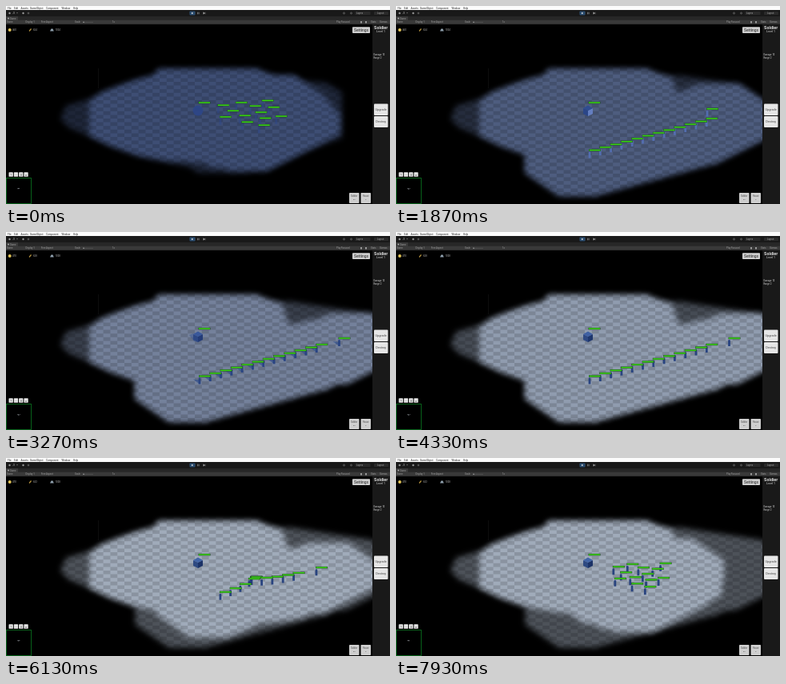
Recreate the animation shown at these times as an HTML page with a canvas. Size 480 px wide and 248 px high, loop 8 s.

```html
<!DOCTYPE html>
<html lang="en">
<head>
<meta charset="utf-8">
<title>Island soldiers</title>
<style>
  html, body { margin: 0; width: 100%; height: 100%; overflow: hidden; background: #000; }
  canvas, svg { position: absolute; left: 0; top: 0; width: 480px; height: 248px; }
  text { font-family: Roboto, "Liberation Sans", sans-serif; fill: #ddd; }
  .mid { text-anchor: middle; }
  .menu text { font-size: 3px; fill: #222; }
  .bar text { font-size: 2.8px; fill: #a4a4a4; }
  .hud text { font-size: 2.8px; fill: #b8b8b8; }
  .btn rect { fill: #e6e6e6; }
  .btn .dim { fill: #cfcfcf; }
  .btn text { fill: #444; text-anchor: middle; }
</style>
</head>
<body>
<canvas id="view" width="480" height="248"></canvas>
<svg viewBox="0 0 480 248">
  <rect width="480" height="5" fill="#fbfbfb"/>
  <g class="menu">
    <text x="2" y="3.6">File</text><text x="10" y="3.6">Edit</text>
    <text x="18.5" y="3.6">Assets</text><text x="30" y="3.6">GameObject</text>
    <text x="50" y="3.6">Component</text><text x="69.5" y="3.6">Window</text>
    <text x="84" y="3.6">Help</text>
  </g>
  <rect y="5" width="480" height="8" fill="#191919"/>
  <rect y="13" width="480" height="5" fill="#272727"/>
  <rect y="13" width="15" height="5" fill="#3a3a3a"/>
  <rect y="17.7" width="480" height="5.3" fill="#393939"/>
  <rect y="22.6" width="480" height=".6" fill="#1c1c1c"/>
  <g class="bar">
    <circle cx="4.5" cy="9" r="1.2" fill="#999"/>
    <text x="8" y="10">JS</text><path d="M13 8.300h2l-1 1.300z" fill="#888"/>
    <circle cx="21.500" cy="9" r="1.200" fill="#999"/>
    <circle cx="28" cy="9" r=".9" fill="none" stroke="#999" stroke-width=".5"/>
    <rect x="229.500" y="6.500" width="7" height="5" rx=".8" fill="#2b4d70"/>
    <path d="M232 7.700v2.600l2.200-1.300z" fill="#ddd"/>
    <path d="M239.600 7.700v2.600m1.500-2.600v2.600" stroke="#bbb" stroke-width=".6"/>
    <path d="M246.700 7.700v2.600l2-1.300zM249.300 7.700v2.600" stroke="#bbb" stroke-width=".3" fill="#bbb"/>
    <circle cx="422.500" cy="9" r="1" fill="none" stroke="#999" stroke-width=".5"/>
    <circle cx="431.500" cy="9" r="1" fill="none" stroke="#999" stroke-width=".5"/>
    <rect x="436.500" y="7" width="19" height="4" rx=".6" fill="#2a2a2a"/>
    <rect x="460" y="7" width="18" height="4" rx=".6" fill="#2a2a2a"/>
    <text x="438" y="10">Layers</text><text x="464" y="10">Layout</text>
    <circle cx="3" cy="15.500" r="1" fill="#aaa"/>
    <text x="5" y="16.500">Game</text>
    <text x="1" y="21.300">Game</text><text x="24.500" y="21.300">Display 1</text>
    <text x="44" y="21.300">Free Aspect</text><text x="86" y="21.300">Scale</text>
    <path d="M97 20.300h12" stroke="#666" stroke-width=".5"/>
    <circle cx="97" cy="20.300" r=".8" fill="#aaa"/><text x="133" y="21.300">1x</text>
    <text x="413" y="21.300">Play Focused</text>
    <path d="M443 19h2v2.500h-2zM449 19h2v2.500h-2z" fill="#999"/>
    <text x="456" y="21.300">Stats</text><text x="467" y="21.300">Gizmos</text>
  </g>

  <rect x="458" y="23" width="22" height="225" fill="#191919"/>
  <text class="mid" x="468.700" y="28.500" font-size="5.400" font-weight="700">Soldier</text>
  <text class="mid" x="468.500" y="33" font-size="3.500">Level 1</text>
  <text x="459.500" y="62.400" font-size="2.600">Damage: 10</text>
  <text x="459.500" y="66" font-size="2.600">Range: 2</text>

  <g class="btn">
    <rect x="460" y="122.500" width="17.500" height="14.500" rx="1"/>
    <text x="468.700" y="131.200" font-size="3.800">Upgrade</text>
    <rect x="460" y="138" width="17.500" height="14" rx="1"/>
    <text x="468.700" y="146.400" font-size="3.800">Destroy</text>
    <rect class="dim" x="433" y="26.300" width="22" height="7.700" rx=".8"/>
    <text x="444" y="31.900" font-size="4.900" font-weight="500">Settings</text>
    <rect class="dim" x="429" y="234" width="12.500" height="13" rx=".8"/>
    <text x="435.200" y="238.500" font-size="2.700">Soldier</text><text x="435.200" y="242.500" font-size="2.500">50</text>
    <rect class="dim" x="443.500" y="234" width="12.500" height="13" rx=".8"/>
    <text x="449.700" y="238.500" font-size="2.700">House</text><text x="449.700" y="242.500" font-size="2.500">5</text>
    <rect x="3.500" y="208.300" width="5.300" height="5.500" rx=".6"/>
    <rect x="9.800" y="208.300" width="5.300" height="5.500" rx=".6"/>
    <rect x="16.100" y="208.300" width="5.300" height="5.500" rx=".6"/>
    <rect x="22.400" y="208.300" width="5.300" height="5.500" rx=".6"/>
    <text x="6.150" y="212.500" font-size="4">?</text><text x="12.450" y="212" font-size="4">...</text>
    <text x="18.750" y="212.500" font-size="4">II</text><text x="25.050" y="212.500" font-size="4">x</text>
  </g>

  <g class="hud">
    <circle cx="4.700" cy="30" r="2" fill="#e3c455"/><text id="gold" x="8" y="31"></text>
    <path d="M29 31.500l2.500-3" stroke="#b8953f" stroke-width="1.200"/><text id="wood" x="34" y="31"></text>
    <path d="M55 31.500l1.500-3h2l1.300 3z" fill="#8fa0ad"/><text id="stone" x="61.500" y="31"></text>
  </g>
</svg>
<script>
const LOOP = 8000, COUNT = 13, CELL_W = 8.8, CELL_H = 4.6;
const MARCH = 400, REGROUP = 5200, SPREAD = 6130;
const ctx = document.getElementById('view').getContext('2d');
const layer = () => Object.assign(document.createElement('canvas'), { width: 480, height: 248 }).getContext('2d');
const ground = layer(), mask = layer();

const clamp = v => Math.max(0, Math.min(1, v));
const mix = (a, b, k) => a.map((v, i) => v + (b[i] - v) * k);
const rgb = c => `rgb(${c.map(Math.round)})`;
const bump = (t, peak, width) => Math.exp(-(((t - peak) / width) ** 2));

// Sunrise: 0 at night, 1 in full daylight.
function daylight(t) {
  const k = clamp((t - 600) / 5000);
  return k * k * (3 - 2 * k);
}

// A loose crowd, ordered so that soldiers keep their side in the line.
function crowd(cx, cy, rx, ry) {
  return Array.from({ length: COUNT }, (_, i) => {
    const r = Math.sqrt((i + .5) / COUNT), a = i * 2.4;
    return [cx + rx * r * Math.cos(a), cy + ry * r * Math.sin(a)];
  }).sort((a, b) => a[0] - a[1] - b[0] + b[1]);
}

const camp = crowd(310, 133, 45, 18), rally = crowd(308, 145, 35, 18), pile = [313, 149];
const slot = i => i === COUNT - 1 ? [423, 133] : [248.5 + i * 13.3, 180.5 - i * 3.6];

function walk(a, b, elapsed, speed) {
  const d = Math.hypot(b[0] - a[0], b[1] - a[1]) || 1;
  return mix(a, b, clamp(elapsed * speed / d));
}

// Position of a soldier's health bar.
function place(i, t) {
  if (t < REGROUP) return walk(camp[i], slot(i), t - MARCH, .047);
  const near = walk(slot(i), pile, Math.min(t, SPREAD) - REGROUP, .031);
  return t < SPREAD ? near : walk(near, rally[i], t - SPREAD, .032);
}

const squad = t => camp.map((_, i) => place(i, t));

const checker = new Path2D();
for (let row = 0; row < 38; row++)
  for (let x = 60 + row % 2 * CELL_W; x < 460; x += CELL_W * 2)
    checker.rect(x, 72 + row * CELL_H, CELL_W, CELL_H);

const homeSight = 'M191 79H314L322 83L345 90L352 111L366 130V151L340 172L290 194H205L166 187L130 175L104 162V120L120 108L140 101L163 93L185 87Z';
const homeKnown = 'M191 79H314L322 83L350 92L400 96L420 108V165L340 194L300 209H240L230 202L165 188L104 163L78 152L68 141L75 125L106 116L140 100L163 92L185 87Z';
const SIGHT = [[-80, -12], [-10, -41], [40, -41], [80, -14], [80, 12], [10, 47], [-38, 47], [-80, 18]];

function addSight(path, t) {
  for (const [x, y] of squad(t)) {
    SIGHT.forEach(([dx, dy], i) => path[i ? 'lineTo' : 'moveTo'](x - 7 + dx, y + 10 + dy));
    path.closePath();
  }
}

function drawGround(t) {
  const base = mix([62, 78, 116], [160, 171, 186], daylight(t));
  ground.globalCompositeOperation = 'source-over';
  ground.fillStyle = rgb(base);
  ground.fillRect(0, 0, 480, 248);
  ground.fillStyle = rgb(base.map(v => v * .86));
  ground.fill(checker);

  const known = new Path2D(homeKnown), seen = new Path2D(homeSight);
  for (let s = 0; s < t; s += 150) addSight(known, s);
  addSight(known, t);
  addSight(seen, t);
  mask.clearRect(0, 0, 480, 248);
  mask.filter = 'blur(3.5px)';
  mask.fillStyle = 'rgba(0,0,0,.48)';
  mask.fill(known);
  mask.fillStyle = '#000';
  mask.fill(seen);

  ground.globalCompositeOperation = 'destination-in';
  ground.drawImage(mask.canvas, 0, 0);
  ctx.drawImage(ground.canvas, 0, 0);
}

function shape(d, fill, alpha = 1) {
  ctx.globalAlpha = alpha;
  ctx.fillStyle = fill;
  ctx.fill(new Path2D(d));
  ctx.globalAlpha = 1;
}

function drawBar(x, y) {
  ctx.fillStyle = '#1d4a22';
  ctx.fillRect(x - 7.5, y - 1.2, 15, 2.5);
  ctx.fillStyle = '#3bd516';
  ctx.fillRect(x - 7, y - .7, 14, 1.5);
}

// Low morning sun brightens the right-hand faces for a while.
function blues(t) {
  const k = daylight(t), glow = 60 * bump(t, 1900, 550);
  return {
    body: rgb(mix([43, 70, 138], [35, 62, 124], k).map(v => v + glow * .7)),
    top: rgb(mix([45, 72, 140], [66, 101, 167], k)),
    left: rgb(mix([43, 69, 137], [46, 74, 130], k)),
    right: rgb(mix([43, 69, 137], [28, 51, 104], k).map(v => v + glow))
  };
}

function drawHome(blue, day, shade) {
  shape('M234 127L229 129L235 137L240 138Z', '#3a568f', shade * .7);
  const cube = clamp(day * 10);
  shape('M233.500 131a6.500 6.500 0 1 0 13 0a6.500 6.500 0 1 0 -13 0', blue.left, .85 * (1 - cube));
  shape('M234 128L240 131V138L234 135Z', blue.left, cube);
  shape('M246 128L240 131V138L246 135Z', blue.right, cube);
  shape('M240 124.500L246 128L240 131L234 128Z', blue.top, cube);
  drawBar(248, 121);
}

function drawSoldier(x, y, body, alpha, shade) {
  const fx = x - 6.5, fy = y + 10;
  shape(`M${fx} ${fy}l-8 -6l8 1z`, '#35528f', shade);
  shape(`M${fx - 1.4} ${fy}v-6.500a1.400 1.400 0 0 1 2.800 0v6.500z`, body, alpha);
}

function drawMap(units) {
  ctx.strokeStyle = '#08611a';
  ctx.lineWidth = 1;
  ctx.strokeRect(.5, 215.5, 31, 32);
  ctx.fillStyle = '#80868c';
  ctx.fillRect(14.5, 228, 1.2, 1.2);
  for (const [x, y] of units) ctx.fillRect(15 + (x - 248) * .016, 228.3 + (y - 131) * .02, .4, .4);
}

const label = (id, v) => { document.getElementById(id).textContent = v; };

function draw(t) {
  ctx.fillStyle = '#000';
  ctx.fillRect(0, 0, 480, 248);
  ctx.fillStyle = '#0d0d0d';
  ctx.fillRect(115, 78, 1, 25);
  drawGround(t);

  const units = squad(t).sort((a, b) => a[1] - b[1]);
  const blue = blues(t), shade = .75 * bump(t, 3100, 700);
  const alpha = .5 + .45 * clamp((t - 700) / 1100);
  drawHome(blue, daylight(t), shade);
  for (const [x, y] of units) drawSoldier(x, y, blue.body, alpha, shade);
  for (const [x, y] of units) drawBar(x, y);
  drawMap(units);

  const income = Math.floor((t + 100) / 2500);
  label('gold', 460 + Math.min(income, 1) * 10);
  label('wood', 624 + Math.min(income, 2) * 4);
  label('stone', 1024 + Math.min(income, 1) * 4);
}

const start = performance.now();
function tick() {
  draw((performance.now() - start) % LOOP);
  requestAnimationFrame(tick);
}
tick();
</script>
</body>
</html>
```
